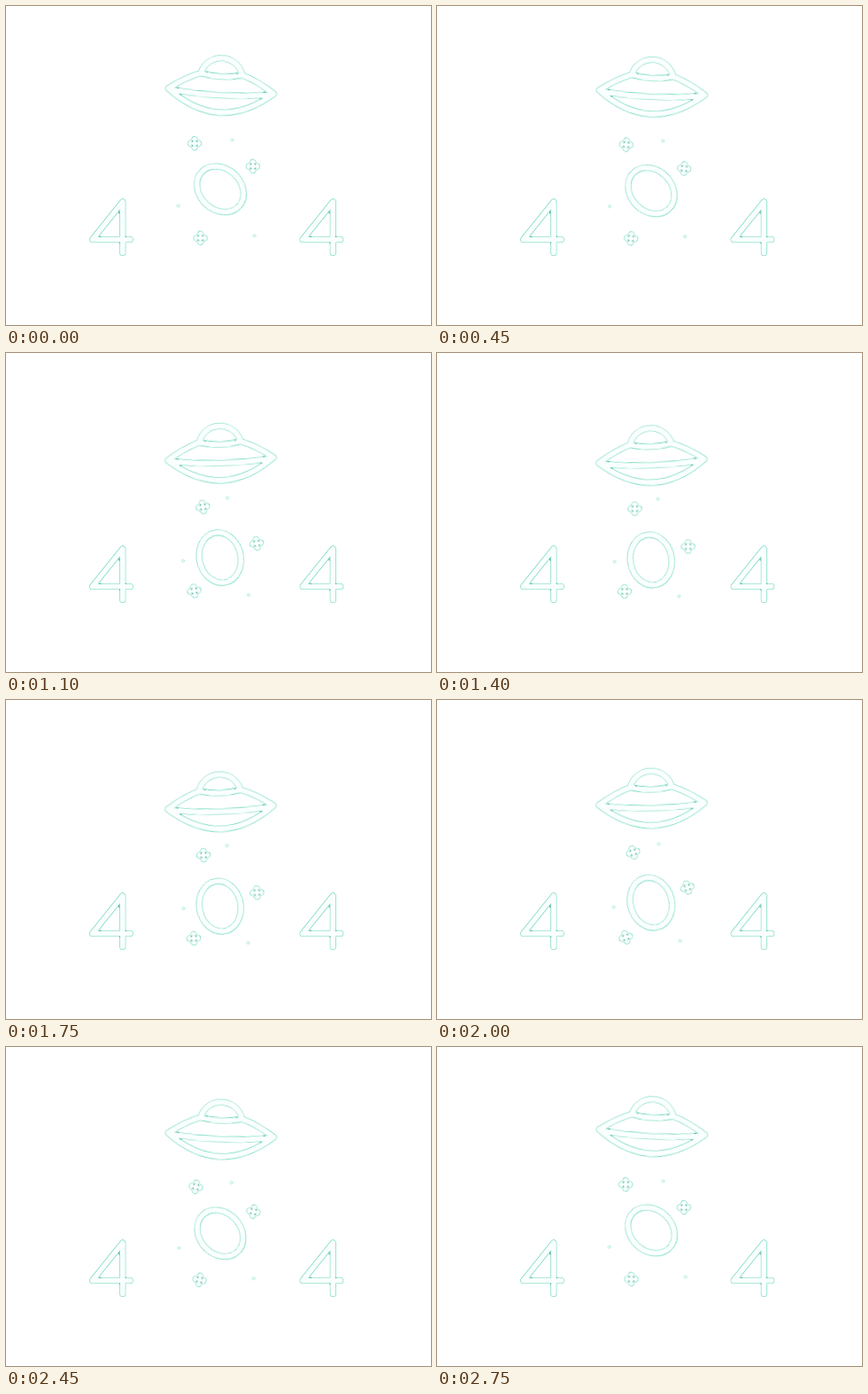
An HTML page for the animation above (2800 ms loop, 480x360 px).

```html
<!DOCTYPE html>
<html lang="en">
<head>
<meta charset="utf-8">
<title>404</title>
<style>
  html, body { margin: 0; width: 100%; height: 100%; overflow: hidden; background: #fff; }
  svg { display: block; width: 480px; height: 360px; }
  path, ellipse, circle { fill: none; stroke-linecap: round; stroke-linejoin: round; }

  /* Each tube is a wide teal stroke with a pale one on top. */
  .edge { stroke: #62d3b7; stroke-width: 7; }
  .core { stroke: #fafffe; stroke-width: 5.9; }
  .spark .edge { stroke-width: 2.1; }
  .spark .core { stroke-width: 1.3; }
  .spark .core, .spark .edge { fill: #fafffe; }
  .dot { stroke: #9ae6d4; stroke-width: .7; }
  .nick { stroke: #4fae98; stroke-width: 1.1; }

  .move {
    transform: translate(var(--x0), var(--y0)) rotate(var(--r0, 0deg));
    animation: drift 1400ms cubic-bezier(.65, 0, .35, 1) -1300ms infinite alternate-reverse;
  }
  @keyframes drift {
    from { transform: translate(var(--x0), var(--y0)) rotate(var(--r0, 0deg)); }
    to   { transform: translate(var(--x1), var(--y1)) rotate(var(--r1, 0deg)); }
  }

  .ship   { --x0: 242.8px; --y0: 96.2px;  --x1: 242.4px; --y1: 122.4px; --r0: 3deg;   --r1: -2.2deg; }
  .planet { --x0: 242px;   --y0: 206.6px; --x1: 241.7px; --y1: 233.6px; --r0: -48deg; --r1: -10deg; }
  .spark  { --r0: 0deg; --r1: 90deg; }
  .s1 { --x0: 213px;   --y0: 155px;   --x1: 223.4px; --y1: 175.8px; }
  .s2 { --x0: 278.8px; --y0: 180.7px; --x1: 283.6px; --y1: 218.6px; }
  .s3 { --x0: 219.6px; --y0: 261.8px; --x1: 211.8px; --y1: 269.2px; }
  .d1 { --x0: 255.5px; --y0: 151.3px; --x1: 249.3px; --y1: 164.8px; }
  .d2 { --x0: 194.5px; --y0: 225.5px; --x1: 200.6px; --y1: 235.6px; }
  .d3 { --x0: 280.6px; --y0: 259.2px; --x1: 273.2px; --y1: 274.6px; }
</style>
</head>
<body>
<svg viewBox="0 0 480 360">
  <defs>
    <path id="four" d="M140.2 263.5H97.6L131.8 221V278.6"/>
    <g id="saucer">
      <path d="M-59.7-.3Q-42-13-23.8-19.5C-17-43.5 16-43.5 23.2-19.5Q42-13 59.7-.3Q0 48-59.7-.3Z"/>
      <path d="M-23.8-19.5Q0-13.5 23.2-19.5M-55 1.2Q0 7.8 55 1.2"/>
    </g>
    <ellipse id="ring" rx="23.3" ry="28.6"/>
    <path id="star" d="M0-4.6Q.8-.8 4.6 0Q.8 .8 0 4.6Q-.8 .8-4.6 0Q-.8-.8 0-4.6Z"/>
    <g id="digit">
      <use href="#four" class="edge"/>
      <use href="#four" class="core"/>
      <path class="nick" d="M127.6 232v2M105.6 260.2h1.5M128.4 267v.6M135.2 260v.6"/>
    </g>
    <g id="sparkle">
      <use href="#star" class="edge"/>
      <use href="#star" class="core"/>
      <path class="nick" d="M2 3L3 2M-2 3L-3 2M2-3L3-2M-2-3L-3-2"/>
    </g>
  </defs>

  <use href="#digit"/>
  <use href="#digit" x="237.5"/>

  <g class="move ship">
    <use href="#saucer" class="edge"/>
    <use href="#saucer" class="core"/>
    <path class="nick" d="M-49.5-1.6l1.5 .2M49.6-1.6l-1.5 .2M-46 5.6l1 .6M46 5.6l-1 .6M-17-21v.6M17-21v.6"/>
  </g>

  <g class="move planet">
    <use href="#ring" class="edge"/>
    <use href="#ring" class="core"/>
  </g>

  <g class="move spark s1"><use href="#sparkle"/></g>
  <g class="move spark s2"><use href="#sparkle"/></g>
  <g class="move spark s3"><use href="#sparkle"/></g>

  <circle class="move dot d1" r="1.5"/>
  <circle class="move dot d2" r="1.5"/>
  <circle class="move dot d3" r="1.5"/>
</svg>
</body>
</html>
```
